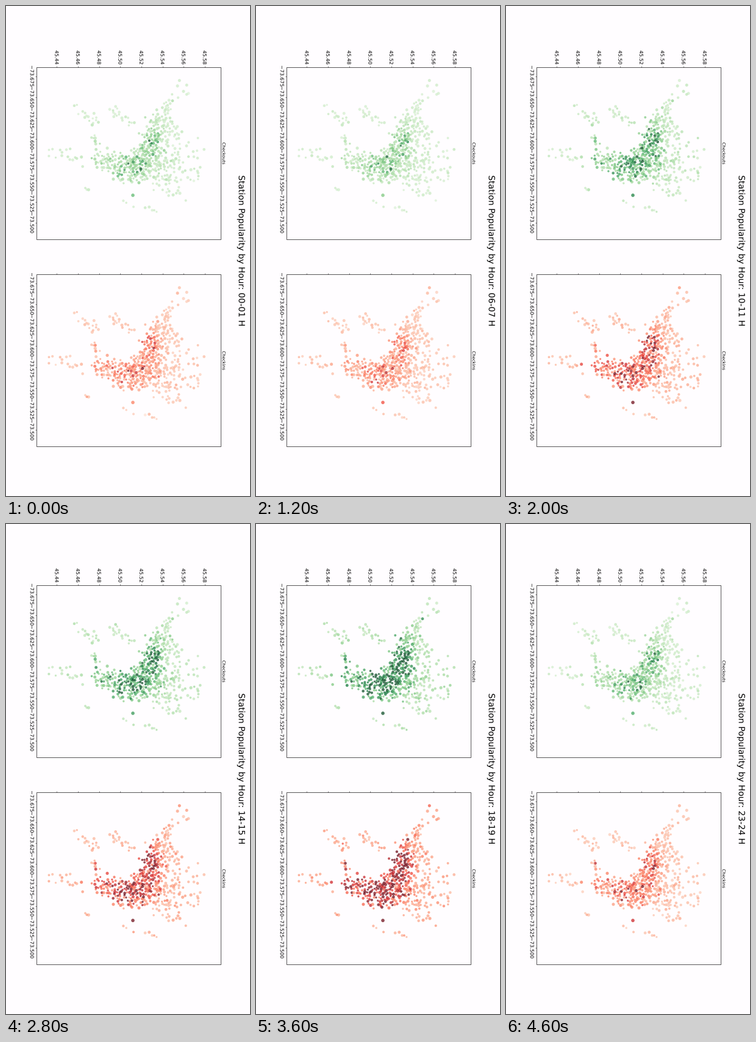
Animation, 400 px wide and 800 px high, one loop 4620 ms. Source, as a matplotlib script:

```python
import matplotlib
import matplotlib.pyplot as plt
import numpy as np
from matplotlib.animation import FuncAnimation
from matplotlib.patches import PathPatch, Rectangle
from matplotlib.path import Path
from matplotlib.textpath import TextPath

W, H, DPI = 400, 800, 100
PX = 72 / DPI
STEP, HOLD, LOOP = 20, 200, 4620
PANEL_GAP = 338.3
FERRY_DOCK = (208, 309)

# Streets with stations: x0, y0, x1, y1, spread, count
STREETS = [
    (284, 124, 290, 142, 5, 7), (272, 148, 262, 172, 4, 14),
    (112, 164, 150, 195, 5, 16), (170, 168, 212, 197, 6, 18),
    (76, 238, 126, 247, 8, 16), (117, 293, 139, 300, 1, 3),
    (192, 318, 254, 338, 3, 8), (142, 210, 154, 226, 4, 7),
    (262, 172, 242, 203, 6, 34), (246, 202, 225, 242, 9, 82),
    (150, 252, 190, 258, 9, 58), (188, 259, 244, 262, 11, 130),
    (264, 190, 266, 285, 15, 88), (290, 215, 316, 290, 10, 20),
    (258, 292, 288, 312, 6, 10),
]


def bell(v, mid, width):
    return np.exp(-((v - mid) / width) ** 2 / 2)


def make_stations():
    rng = np.random.default_rng(21)
    pts = [FERRY_DOCK]
    for x0, y0, x1, y1, spread, count in STREETS:
        goal = len(pts) + count
        while len(pts) < goal:
            t = rng.uniform()
            x = x0 + t * (x1 - x0) + rng.normal(0, spread)
            y = y0 + t * (y1 - y0) + rng.normal(0, spread)
            on_hill = ((x - 190) / 27) ** 2 + ((y - 218) / 21) ** 2 < 1
            crowded = np.hypot(*(np.array(pts) - (x, y)).T).min() < 2.9
            if not on_hill and not crowded:
                pts.append((x, y))
    diam = rng.uniform(3.2, 5.2, len(pts))
    diam[0] = 5.6
    return np.array(pts), diam


def activity(hour):
    """Trips over the day: late night, morning rush, daytime, evening rush."""
    night = min(hour, 24 - hour)
    return (.06 + .28 * bell(night, 0, 1.5) + .5 * bell(hour, 8, 1.1)
            + .68 * bell(hour, 14.5, 5) + .45 * bell(hour, 17.5, 1.6))


def make_values(x, y, seed, gain):
    rng = np.random.default_rng(seed)
    downtown = bell(x, 205, 28) * bell(y, 260, 17)
    plateau = bell(x, 235, 14) * bell(y, 224, 26)
    west = .6 * bell(x, 155, 20) * bell(y, 245, 22)
    weight = .1 + .9 * np.maximum.reduce([downtown, plateau, west])
    weight *= rng.lognormal(-.1, .45, len(x))
    weight[0] = 1.3
    rows = []
    for hour in range(24):
        level = gain * activity(hour)
        jitter = rng.lognormal(0, .25, len(x))
        noise = rng.normal(0, .025, len(x))
        rows.append(.19 + .06 * level + .8 * level * weight * jitter + noise)
    return np.clip(rows, 0, 1)


def text_path(x, y, text, size):
    """Text reading downwards with its baseline at x, centred on y."""
    glyphs = TextPath((0, 0), text, size=size, prop={"family": "DejaVu Sans"})
    box = glyphs.get_extents()
    along, up = glyphs.vertices.T
    mid = (box.x0 + box.x1) / 2
    return Path(np.column_stack([x + up, y + along - mid]), glyphs.codes)


def label(x, y, text, size):
    patch = PathPatch(text_path(x, y, text, size), fc="black", lw=0)
    return ax.add_patch(patch)


def tick(xs, ys):
    ax.plot(xs, ys, color="black", lw=.5 * PX, solid_capstyle="butt")


def draw_panel(dy, title, lat_labels):
    top = 100 + dy
    ax.add_patch(Rectangle((49.6, top), 302.2, 280.9, fill=False,
                           lw=.65 * PX, ec="black"))
    label(354.7, 240.7 + dy, title, 6.94)
    for k in range(8):
        x, y = 83.3 + 34.64 * k, 114.5 + 34.18 * k + dy
        tick([47.6, 49.6], [y, y])
        tick([x, x], [top - 2, top])
        label(39.8, y, f"\u2212{73.675 - .025 * k:.3f}", 8.1)
        if lat_labels:
            label(x - 2.9, 84, f"{45.44 + .02 * k:.2f}", 8.1)
    return ax.scatter(XY[:, 0], XY[:, 1] + dy, s=(DIAM * PX) ** 2,
                      linewidths=0, alpha=.7, zorder=3)


XY, DIAM = make_stations()

fig = plt.figure(figsize=(W / DPI, H / DPI), dpi=DPI, facecolor="#fffdff")
ax = fig.add_axes([0, 0, 1, 1])
ax.set_xlim(0, W)
ax.set_ylim(H, 0)
ax.axis("off")

panels = []
for n, (title, cmap, gain) in enumerate([("Checkouts", "Greens", 1),
                                         ("Checkins", "Reds", 1.1)]):
    dots = draw_panel(n * PANEL_GAP, title, n == 0)
    values = make_values(*XY.T, seed=n + 3, gain=gain)
    panels.append((dots, matplotlib.colormaps[cmap](values)))

headings = [text_path(381.6, 399.6, f"Station Popularity by Hour: {h:02d}-{h + 1:02d} H", 13.89)
            for h in range(24)]
heading = ax.add_patch(PathPatch(headings[0], fc="black", lw=0))


def update(i):
    hour = i * STEP // HOLD
    heading.set_path(headings[hour])
    for dots, colors in panels:
        dots.set_facecolor(colors[hour])
    return [heading] + [dots for dots, _ in panels]


anim = FuncAnimation(fig, update, frames=LOOP // STEP, interval=STEP,
                     repeat=True, repeat_delay=0, blit=False)
plt.show()
```
